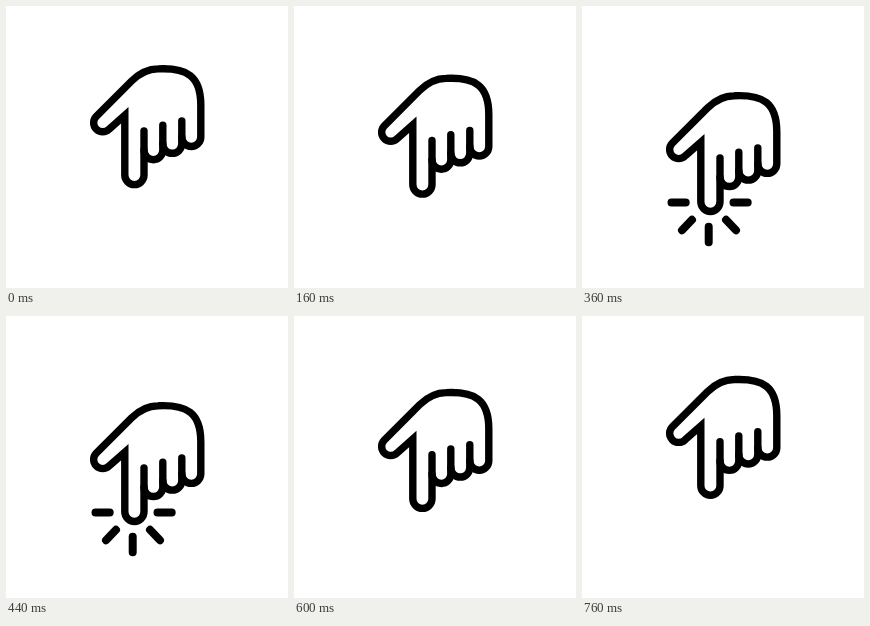
An HTML page for the animation above (0.8 s loop, 282 by 282 pixels).

```html
<!DOCTYPE html>
<html lang="en">
<head>
<meta charset="utf-8">
<title>Tap here</title>
<style>
  html, body { margin: 0; height: 100%; overflow: hidden; background: #fff; }
  svg { display: block; width: 100%; height: 100%; }
  path { fill: none; stroke: #000; stroke-width: 7.4; stroke-linecap: round; stroke-miterlimit: 8; }
  #rays { stroke-width: 8; }
</style>
</head>
<body>
<svg viewBox="0 0 282 282">
  <g id="hand">
    <!-- thumb, back of the hand, little finger -->
    <path d="M138 125V169A9.6 9.6 0 0 1 118.8 169V109.3L103.1 123.1A9 9 0 0 1 90.3 110.3L125.6 75
             C132.5 68.3 140.5 63 152 62.9C181 61.5 194.8 70 194.8 99V131A9.5 9.5 0 0 1 175.8 131V115"/>
    <!-- ring and middle fingers -->
    <path d="M175.8 131V137.8A9.5 9.5 0 0 1 156.8 137.8V119.3"/>
    <path d="M156.8 137.8V144.3A9.4 9.4 0 0 1 138 144.3"/>
    <path id="rays" d="M89.5 169.6H103.7M151.5 169.6H165.7M100 197.5L110 187M144 187L154 197.5M126.7 193.8V209.3"/>
  </g>
</svg>
<script>
  const LOOP = 800, STEP = 40, TRAVEL = 27.5;
  const hand = document.getElementById('hand');
  const rays = document.getElementById('rays');

  function draw() {
    const t = Math.floor(performance.now() % LOOP / STEP) * STEP;
    const y = TRAVEL * (1 - Math.cos(2 * Math.PI * t / LOOP)) / 2;
    hand.setAttribute('transform', `translate(0 ${y.toFixed(2)})`);
    rays.setAttribute('visibility', t >= 280 && t < 520 ? 'visible' : 'hidden');
    requestAnimationFrame(draw);
  }
  draw();
</script>
</body>
</html>
```
